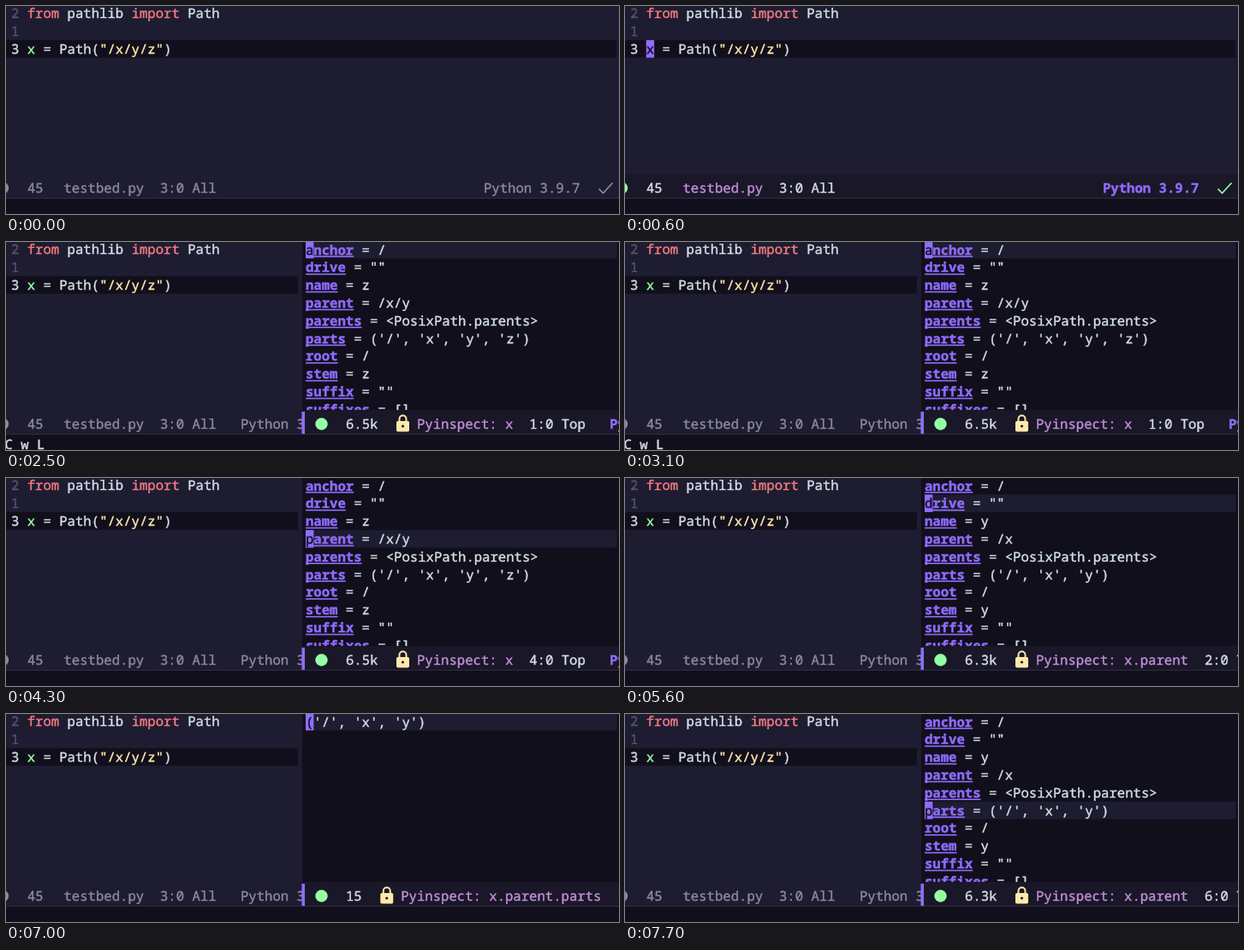
Recreate the animation shown at these times as an HTML page. Size 716x244 px, loop 8000 ms.

```html
<!DOCTYPE html>
<html lang="en">
<head>
<meta charset="utf-8">
<title>Python inspector</title>
<style>
html, body { margin: 0; width: 100%; height: 100%; overflow: hidden; background: #1e1c31; }
svg { display: block; width: 716px; height: 244px; }
text {
  font: 15.625px "Noto Sans Mono", "DejaVu Sans Mono", monospace;
  white-space: pre;
  text-rendering: geometricPrecision;
  stroke-width: .4px;
}
.b { font-weight: 700; }
</style>
</head>
<body>
<svg id="stage" viewBox="0 0 716 244"></svg>
<script>
const CH = 9.375, ROW = 20.83, LOOP = 8000;
const C = {
  bg: '#1e1c31', dark: '#120f1c', bar: '#1a1728', rule: '#2e2c42',
  fg: '#d3e0e6', dim: '#55536c', idle: '#8b8a9b', red: '#f57c80',
  green: '#95ffa4', yellow: '#ffe9aa', violet: '#906cff', purple: '#c18fda'
};
const stage = document.getElementById('stage');

const esc = s => s.replace(/&/g, '&amp;').replace(/</g, '&lt;');
const rect = (x, y, w, h, fill) =>
  `<rect x="${x}" y="${y}" width="${w}" height="${h}" fill="${fill}"/>`;
const text = (x, y, s, fill = C.fg, cls = '') =>
  `<text x="${x}" y="${y}" fill="${fill}" stroke="${fill}" class="${cls}">${esc(s)}</text>`;
const dot = (x, y, fill) => `<circle cx="${x}" cy="${y}" r="7.2" fill="${fill}"/>`;
const band = (x, base, w, fill) => rect(x, base - 15.9, w, 20.6, fill);

// Draws consecutive [string, colour] pieces on the character grid.
function line(x, y, parts) {
  return parts.map(([s, fill]) => {
    const out = text(x, y, s, fill);
    x += s.length * CH;
    return out;
  }).join('');
}

const cursor = (x, base, ch) => band(x, base, CH, C.violet) + text(x, base, ch, C.dark);

function code(width, active) {
  const y = n => 14.3 + n * ROW;
  return band(0, y(2), width - 2.5, C.dark) +
    line(6, y(0), [['2 ', C.dim], ['from', C.red], [' pathlib '], ['import', C.red], [' Path']]) +
    text(6, y(1), '1', C.dim) +
    line(6, y(2), [['3 '], ['x', C.green], [' = Path('], ['"/x/y/z"', C.yellow], [')']]) +
    (active ? cursor(6 + 2 * CH, y(2), 'x') : '');
}

function codeBar(y, langX, active) {
  const pick = c => active ? c : C.idle;
  return rect(0, y - 21.5, 716, 28, active ? C.bar : C.bg) +
    rect(0, y + 6.5, 716, 1, C.rule) +
    dot(-4, y - 5, pick(C.green)) +
    text(25, y, '45', pick(C.fg)) +
    text(67.5, y, 'testbed.py', pick(C.purple)) +
    text(180, y, '3:0 All', pick(C.fg)) +
    text(langX, y, 'Python 3.9.7', pick(C.violet), active ? 'b' : '') +
    `<path d="M${langX + 134.5} ${y - 4}l5 5 11-12" fill="none" stroke="${pick(C.green)}" stroke-width="1.7"/>`;
}

const fields = (path, name, parts) => [
  ['anchor', '/'], ['drive', '""'], ['name', name], ['parent', path],
  ['parents', '<PosixPath.parents>'], ['parts', parts], ['root', '/'],
  ['stem', name], ['suffix', '""'], ['suffixes', '[]']
];
const objects = {
  'x': { size: '6.5k', rows: fields('/x/y', 'z', "('/', 'x', 'y', 'z')") },
  'x.parent': { size: '6.3k', rows: fields('/x', 'y', "('/', 'x', 'y')") },
  'x.parent.parts': { size: '15', rows: [['', "('/', 'x', 'y')"]] }
};

function inspector(x, top, obj, cur) {
  const out = [rect(x - 4, top, 720 - x, 204 - top, C.dark)];
  objects[obj].rows.forEach(([key, val], i) => {
    const y = top + 15.5 + i * ROW;
    if (y > 215) return;
    if (i === cur - 1) out.push(band(x, y, 713.5 - x, C.bg));
    const w = key.length * CH;
    if (key) out.push(text(x, y, key, C.violet, 'b'), rect(x, y + 1.6, w, 1.6, C.violet));
    out.push(text(x + w, y, key ? ' = ' + val : val));
    if (i === cur - 1) out.push(cursor(x, y, (key || val)[0]));
  });
  return out.join('');
}

function lock(x, y) {
  return `<path d="M${x + 3.5} ${y - 8}v-3a4 4 0 0 1 8 0v3" fill="none" stroke="${C.yellow}" stroke-width="2"/>` +
    `<rect x="${x}" y="${y - 8.5}" width="15" height="12.5" rx="1.8" fill="${C.yellow}"/>` +
    `<circle cx="${x + 7.5}" cy="${y - 2.5}" r="1.6" fill="${C.bar}"/>`;
}

function inspectorBar(x, obj, cur, modeX) {
  const y = 218.5, title = 'Pyinspect: ' + obj, { size } = objects[obj];
  const lockX = x + 47 + size.length * CH + 21.5;
  const pos = lockX + 24 + (title.length + 2) * CH;
  return rect(x - 4, 197, 720 - x, 28, C.bar) + rect(x - 4, 225, 720 - x, 1, C.rule) +
    rect(x - 4.5, 199, 3.5, 26, C.violet) +
    dot(x + 18.5, y - 5, C.green) + text(x + 47, y, size) + lock(lockX, y) +
    text(lockX + 24, y, title, C.purple) +
    text(pos, y, cur + ':0 Top') +
    text(Math.max(modeX, pos + 10 * CH), y, 'Python Inspector', C.violet, 'b');
}

const layouts = {
  single: s => code(716, s.active) + codeBar(218.5, 558, s.active),
  stacked: s => code(716) + codeBar(114.5, 558) +
    inspector(-22.5, 122, s.obj, s.cur) + inspectorBar(-22.5, s.obj, s.cur, 549),
  split: s => code(343.5) + codeBar(218.5, 274) +
    inspector(350, -1, s.obj, s.cur) + inspectorBar(350, s.obj, s.cur, 549)
};

const view = (layout, obj, cur, echo = '') => ({ layout, obj, cur, echo });
const split = (obj, cur, echo) => view('split', obj, cur, echo);
const timeline = [
  [0, { layout: 'single', echo: '' }],
  [500, { layout: 'single', echo: '', active: true }],
  [1600, view('stacked', 'x', 1, 'I')],
  [2000, view('stacked', 'x', 1, 'C-')],
  [2300, view('stacked', 'x', 1, 'C w-')],
  [2500, split('x', 1, 'C w L')],
  [3600, split('x', 2)],
  [3800, split('x', 3)],
  [4000, split('x', 4)],
  [5000, split('x.parent', 1)],
  [5600, split('x.parent', 2)],
  [5800, split('x.parent', 3)],
  [6000, split('x.parent', 4)],
  [6200, split('x.parent', 5)],
  [6400, split('x.parent', 6)],
  [6800, split('x.parent.parts', 1)],
  [7500, split('x.parent', 6)]
];

let shown = null;
function tick() {
  const t = performance.now() % LOOP;
  const state = timeline.filter(([at]) => at <= t).pop()[1];
  if (state !== shown) {
    shown = state;
    stage.innerHTML = rect(0, 0, 716, 244, C.bg) + layouts[state.layout](state) +
      rect(0, 226, 716, 18, C.dark) + text(-1.5, 242.8, state.echo);
  }
  requestAnimationFrame(tick);
}
tick();
</script>
</body>
</html>
```
